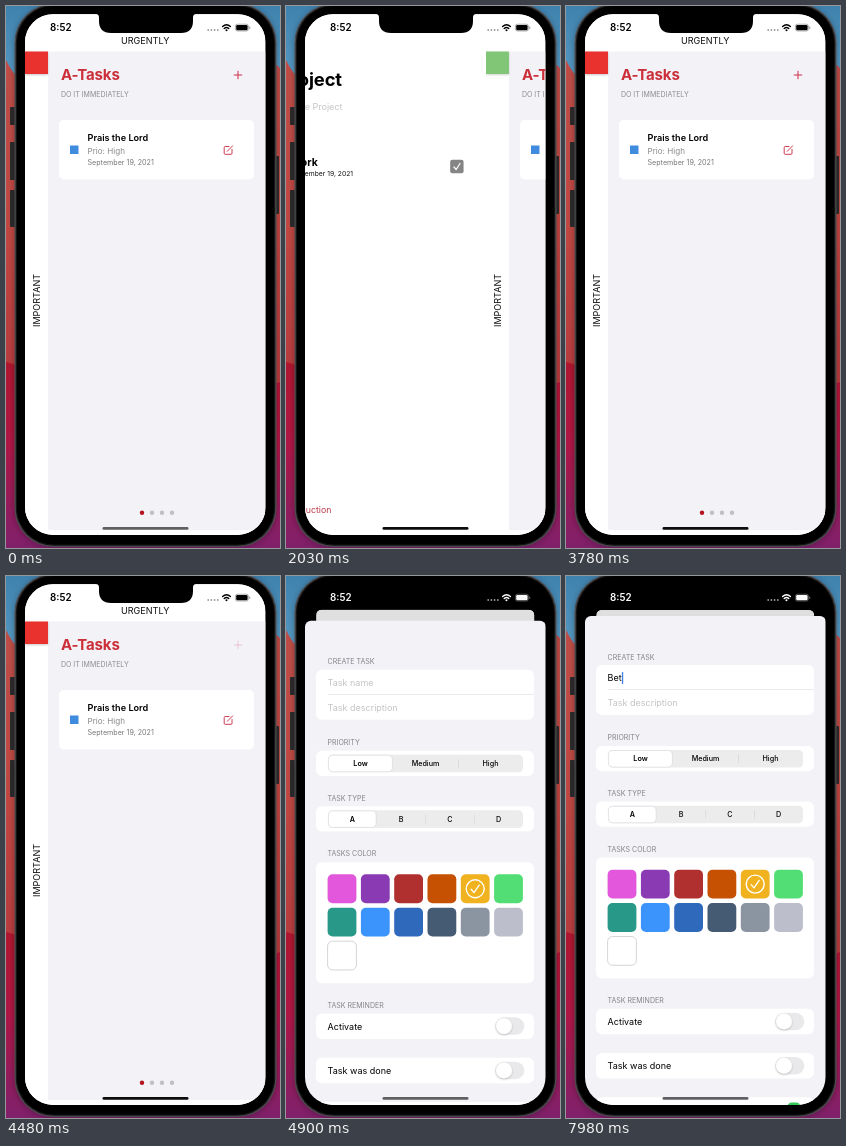
Recreate the animation shown at these times as an HTML page. Size 274 by 542 pixels, loop 8000 ms.

```html
<!DOCTYPE html>
<html lang="en">
<head>
<meta charset="utf-8">
<title>Task planner</title>
<style>
  html, body { margin: 0; width: 100%; height: 100%; overflow: hidden; background: #000; }
  svg { display: block; width: 100%; height: 100%; }
  text { font-family: Inter, "Liberation Sans", sans-serif; white-space: pre; }
</style>
</head>
<body>
<svg id="stage" viewBox="0 0 274 542" preserveAspectRatio="none"></svg>
<script>
const LOOP = 8000, TICK = 70;
const SHIFT = 218;
const SHEET_TOP = 40;

// y is the vertical middle of the capitals
const text = (x, y, str, size, fill = '#000', weight = 400, extra = '') =>
  `<text x="${x}" y="${y + size * 0.364}" font-size="${size}" fill="${fill}" font-weight="${weight}" ${extra}>${str}</text>`;
const middle = 'text-anchor="middle"';
const rect = (x, y, w, h, fill, r = 0, extra = '') =>
  `<rect x="${x}" y="${y}" width="${w}" height="${h}" rx="${r}" fill="${fill}" ${extra}/>`;
const line = (d, stroke, width = 1, extra = '') =>
  `<path d="${d}" fill="none" stroke="${stroke}" stroke-width="${width}" stroke-linecap="round" stroke-linejoin="round" ${extra}/>`;
const circle = (x, y, r, fill, extra = '') =>
  `<circle cx="${x}" cy="${y}" r="${r}" fill="${fill}" ${extra}/>`;

const defs = `<defs>
  <linearGradient id="wall" x1="0" y1="0" x2="0" y2="1">
    <stop offset="0" stop-color="#bd504a"/><stop offset=".4" stop-color="#c04742"/>
    <stop offset=".66" stop-color="#b83c3e"/>
  </linearGradient>
  <linearGradient id="dusk" x1="0" y1="0" x2="0" y2="1">
    <stop offset="0" stop-color="#b0162f"/><stop offset=".45" stop-color="#ae1646"/>
    <stop offset="1" stop-color="#80206b"/>
  </linearGradient>
  <linearGradient id="sky" x1="0" y1="0" x2="0" y2="1">
    <stop offset="0" stop-color="#3f82ae"/><stop offset="1" stop-color="#5c9fc8"/>
  </linearGradient>
  <clipPath id="screen"><rect x="19" y="8.2" width="240.5" height="520.8" rx="28"/></clipPath>
  <clipPath id="card"><rect x="19" y="8" width="240.5" height="540" rx="6"/></clipPath>
  <filter id="soft" x="-30%" y="-30%" width="160%" height="170%">
    <feDropShadow dx="0" dy="1" stdDeviation=".9" flood-opacity=".22"/>
  </filter>
  <filter id="glow" x="-10%" y="-10%" width="120%" height="120%">
    <feDropShadow dx="0" dy="1" stdDeviation="3" flood-opacity=".3"/>
  </filter>
</defs>`;

const wallpaper =
  rect(0, 0, 274, 542, 'url(#wall)') +
  '<path d="M0 0H274V62Q262 50 240 40L40 90Q12 80 0 54Z" fill="url(#sky)"/>' +
  '<path d="M0 356Q16 358 40 385L240 400Q260 380 274 376V542H0Z" fill="url(#dusk)"/>';

const phone =
  [[101, 18], [136, 38], [184, 37]].map(([y, h]) => rect(4, y, 6, h, '#2c2a2d', 1)).join('') +
  rect(268, 150, 5, 58, '#2c2a2d', 1) +
  rect(8.5, -2.5, 262, 543.5, '#4b4a4d', 39, 'filter="url(#glow)"') +
  rect(9.8, -1.2, 259.4, 541, '#151516', 38) +
  rect(11, 0, 257, 538.6, '#000', 37);

const taskPage = `<g id="tasks">
  ${rect(19, 8, 241, 521, '#fff')}
  ${rect(42, 45.5, 218, 478.5, '#f2f2f7')}
  ${text(139.2, 34.5, 'URGENTLY', 9.05, '#111', 400, middle)}
  ${text(30.5, 294.5, 'IMPORTANT', 9.05, '#111', 400, middle + ' transform="rotate(-90 30.5 294.5)"')}
  ${rect(19, 45.5, 23, 22.5, '#e9302f', 0, 'id="corner" filter="url(#soft)"')}
  ${text(55, 69, 'A-Tasks', 15, '#cb303a', 700, 'letter-spacing="-.15"')}
  ${text(55, 88.5, 'DO IT IMMEDIATELY', 7, '#8c8c91')}
  ${line('M228.2 69H235.8M232 65.2V72.8', '#cf2f46', 1, 'id="plus"')}
  ${rect(53, 114, 195, 59.5, '#fff', 5)}
  ${rect(64, 139.5, 8.5, 8.5, '#3f8bde')}
  ${text(81.5, 132, 'Prais the Lord', 9.15, '#000', 600)}
  ${text(81.5, 145, 'Prio: High', 8.1, '#8a8a8e')}
  ${text(81.5, 156.7, 'September 19, 2021', 7.15, '#77777b')}
  ${line('M223 140.5H219.2Q218.2 140.5 218.2 141.5V147.3Q218.2 148.3 219.2 148.3H225Q226 148.3 226 147.3V143.5M221.3 145.3L226.6 139.9', '#d03a50', 1)}
  ${[136, 146, 156, 166].map((x, i) => circle(x, 506.7, 2.2, i ? '#bfbfc4' : '#b5121f')).join('')}
</g>`;

const projectPage = `<g id="project">
  ${rect(19, 8, SHIFT, 521, '#fff')}
  ${text(30, 73, 'Project', 18.4, '#000', 700, 'letter-spacing="-.1"')}
  ${text(32.5, 101, 'Create Project', 9.05, '#c5c5c8')}
  ${text(41.5, 156.5, 'Work', 10.5, '#000', 700)}
  ${text(41.3, 167.3, 'September 19, 2021', 6.75, '#111')}
  ${rect(201.2, 153.8, 13.4, 13.4, '#858585', 2)}
  ${line('M205 161L207.2 163.5L211 157.5', '#fff', 1.2)}
  ${text(32.5, 504, 'Introduction', 8.8, '#b93b4b')}
</g>`;

const cell = (y, h) => rect(30, y, 218, h, '#fff', 6);
const label = (y, str) => text(41.5, y, str, 7.05, '#85858a');

function segments(y, names) {
  const w = 195 / names.length;
  const marks = names.map((n, i) =>
    (i > 1 ? rect(42 + w * i, y + 4.5, 0.6, 8.5, '#d2d2d6') : '') +
    text(42 + w * (i + 0.5), y + 8.8, n, 7.2, '#000', i ? 500 : 600, middle));
  return rect(42, y, 195, 17.6, '#ececed', 4.5) +
    rect(42.4, y + 0.5, w - 1, 16.6, '#fff', 4.2, 'stroke="#d5d5d8" stroke-width=".6"') + marks.join('');
}

const toggle = (y, fill, x) =>
  rect(209, y, 29.3, 17.5, fill, 8.75) + circle(x, y + 8.75, 7.9, '#fff', 'filter="url(#soft)"');

const colors = ['#e257db', '#8a3bb4', '#b03030', '#c65102', '#f0b21f', '#52de75',
  '#289889', '#3b94fc', '#2f69bc', '#455b73', '#8a95a1', '#bcbfcb', '#fff'];
const swatches = colors.map((c, i) =>
  rect(41.6 + 33.3 * (i % 6), 293.7 + 33.4 * Math.floor(i / 6), 28.8, 28.8, c, 5,
    c === '#fff' ? 'stroke="#c9c9cc" stroke-width=".8"' : '')).join('');

const sheet = `<g id="sheet">
  ${rect(19, SHEET_TOP, 241, 520, '#f2f2f7', 6)}
  ${label(81, 'CREATE TASK')}${cell(89, 50)}
  ${rect(42, 113.3, 206, 0.6, '#dcdcdf')}
  ${text(41.6, 101.7, 'Task name', 9, '#c3c3c6', 400, 'id="name"')}
  ${rect(41.8, 96, 1.3, 12, '#3d7fe0', 0.5, 'id="caret"')}
  ${text(41.6, 126.6, 'Task description', 9, '#c3c3c6')}
  ${label(161.5, 'PRIORITY')}${cell(170, 25.3)}${segments(174, ['Low', 'Medium', 'High'])}
  ${label(217.3, 'TASK TYPE')}${cell(225.5, 25.3)}${segments(229.7, ['A', 'B', 'C', 'D'])}
  ${label(273, 'TASKS COLOR')}${cell(281.5, 121)}${swatches}
  ${circle(189.2, 308.1, 9, 'none', 'stroke="#fff" stroke-width="1.4"')}
  ${line('M185.2 308.6L188 311.9L193.2 304.4', '#fff', 1.3)}
  ${label(424.7, 'TASK REMINDER')}${cell(432.8, 25.5)}
  ${text(41.6, 445.6, 'Activate', 9)}${toggle(436.7, '#e9e9eb', 218)}
  ${cell(477, 25.5)}
  ${text(41.6, 489.8, 'Task was done', 9)}${toggle(481, '#e9e9eb', 218)}
  ${cell(521.3, 25.5)}
  ${rect(221, 526.5, 14, 10, '#34c759', 5)}
</g>`;

const status = `<g id="status">
  ${text(44, 21.5, '8:52', 9.8, 'currentColor', 600)}
  ${[202.2, 205.4, 208.6, 211.8].map(x => circle(x, 24, 0.9, '#9a9a9e')).join('')}
  ${line('M216.6 20.6Q220.5 17 224.4 20.6M218.2 22.6Q220.5 20.5 222.8 22.6', 'currentColor', 1.4)}
  ${circle(220.5, 24.3, 1, 'currentColor')}
  ${rect(229.4, 18.2, 13, 6.8, 'none', 2, 'stroke="currentColor" stroke-width=".6" stroke-opacity=".5"')}
  ${rect(230.2, 19, 11.4, 5.2, 'currentColor', 1.3)}
  ${rect(243.3, 20.4, 0.9, 2.4, 'currentColor', 0.4, 'opacity=".5"')}
</g>`;

const notch = '<path d="M90 7H190V8Q187 8 187 11.5V15Q187 27 175 27H105Q93 27 93 15V11.5Q93 8 90 8Z" fill="#000"/>';

const $ = id => document.getElementById(id);
$('stage').innerHTML = defs + wallpaper + phone +
  `<g clip-path="url(#screen)">
    <g id="back" clip-path="url(#card)">
      ${rect(19, 8, 241, 540, '#fff')}${taskPage}${projectPage}
      ${rect(19, 8, 241, 540, '#000', 0, 'id="dim"')}
    </g>
    ${sheet}${status}${rect(96.5, 521, 86, 2.8, '#111', 1.4, 'id="home"')}
  </g>` + notch;

const clamp = v => Math.min(1, Math.max(0, v));
const ramp = (t, from, to) => clamp((t - from) / (to - from));
const smooth = v => v * v * (3 - 2 * v);
const mix = (a, b, p) => `rgb(${a.map((v, i) => Math.round(v + (b[i] - v) * p))})`;
const set = (id, attrs) => {
  for (const key in attrs) $(id).setAttribute(key, attrs[key]);
};

// critically damped spring
const spring = ms => {
  const u = Math.max(0, ms) * 0.0164;
  return 1 - (1 + u) * Math.exp(-u);
};

const RED = [233, 48, 47], GREEN = [76, 217, 100];
const keys = [[6930, 'B'], [7280, 'Be'], [7910, 'Bet']];

// a tap dims the button at once, then it fades back
const tapped = (t, at) => t < at ? 1 : 0.2 + 0.8 * ramp(t, at + 70, at + 420);

function draw(t) {
  const slide = smooth(ramp(t, 1720, 2140)) - smooth(ramp(t, 3330, 3750));
  set('tasks', { transform: `translate(${SHIFT * slide} 0)` });
  set('project', { transform: `translate(${SHIFT * (slide - 1)} 0)` });
  set('corner', { fill: mix(RED, GREEN, slide), opacity: Math.min(tapped(t, 1680), t < 3290 ? 1 : tapped(t, 3290)) });
  set('plus', { opacity: tapped(t, 4410) });

  const rise = t >= 5040 ? 1 : spring(t - 4490);
  const scale = 1 - 0.095 * rise;
  set('back', { transform: `translate(139.2 ${8 + 26 * rise}) scale(${scale}) translate(-139.2 -8)` });
  set('dim', { opacity: 0.125 * rise });
  set('sheet', { transform: `translate(0 ${502 * (1 - rise)})` });
  set('status', { color: mix([0, 0, 0], [255, 255, 255], rise ** 3) });
  set('home', { fill: t < 1750 || t > 4690 ? '#606063' : '#0c0c0c' });

  const typed = keys.filter(([at]) => t >= at).pop();
  const field = $('name');
  field.textContent = typed ? typed[1] : 'Task name';
  set('name', { fill: typed ? '#000' : '#c3c3c6' });
  set('caret', {
    x: typed ? 41.8 + field.getComputedTextLength() : 41.8,
    opacity: t < 6090 ? 0 : typed ? 1 : 1 - ramp(t, 6580, 6790)
  });
}

const start = performance.now();
function frame() {
  const t = (performance.now() - start) % LOOP;
  draw(Math.floor(t / TICK) * TICK);
  requestAnimationFrame(frame);
}
frame();
</script>
</body>
</html>
```
